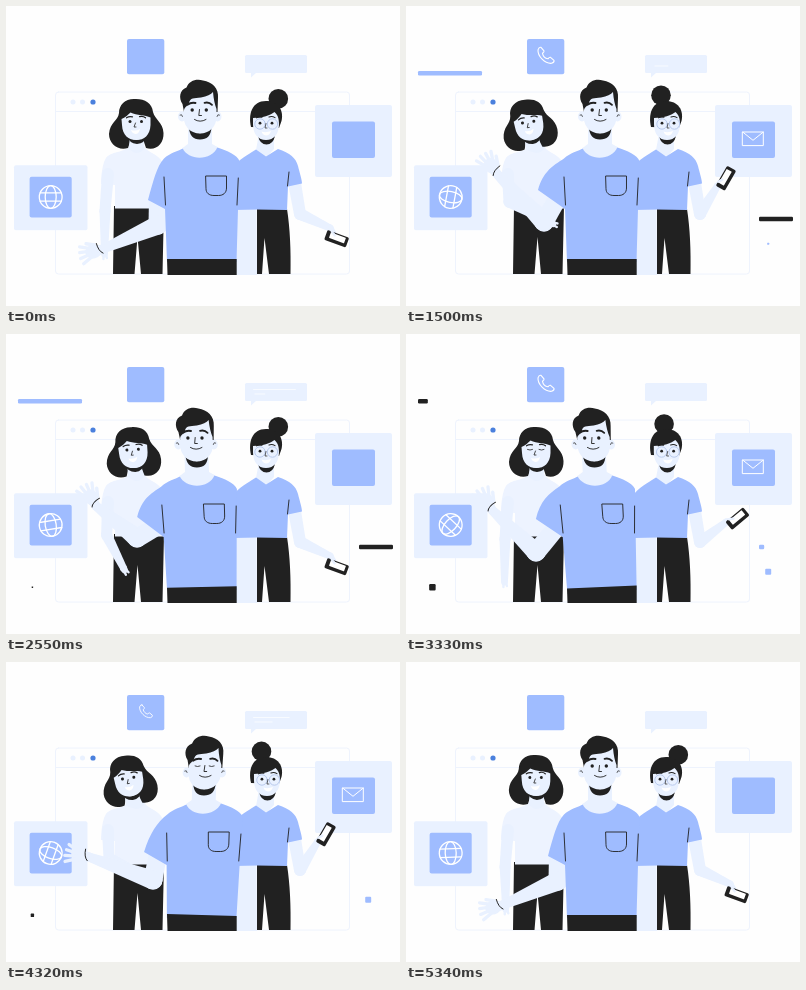
An HTML page with a canvas that plays this animation: 394 by 300 pixels, repeating every 5370 ms.

```html
<!DOCTYPE html>
<html lang="en">
<head>
<meta charset="utf-8">
<title>Team waving</title>
<style>
  html, body { margin: 0; width: 100%; height: 100%; overflow: hidden; background: #fefefe; }
  canvas { display: block; width: 394px; height: 300px; }
</style>
</head>
<body>
<canvas id="stage"></canvas>
<script>
const W = 394, H = 300, LOOP = 5370;
const PALE = '#e9f1ff', SHIRT = '#edf3ff', BLUE = '#9fbcff', DARK = '#212121',
      WHITE = '#ffffff', VIVID = '#3c82f0', EDGE = '#eef3fd';

const canvas = document.getElementById('stage');
const c = canvas.getContext('2d');
const dpr = window.devicePixelRatio || 1;
canvas.width = W * dpr;
canvas.height = H * dpr;

// ---------- drawing helpers ----------
function fill(d, color) { c.fillStyle = color; c.fill(new Path2D(d)); }

function line(d, color = DARK, width = 1) {
  c.strokeStyle = color;
  c.lineWidth = width;
  c.lineCap = c.lineJoin = 'round';
  c.stroke(new Path2D(d));
}

function dot(x, y, rx, color, ry = rx) {
  c.fillStyle = color;
  c.beginPath();
  c.ellipse(x, y, rx, ry, 0, 0, 7);
  c.fill();
}

function box(x, y, w, h, r, color) {
  c.fillStyle = color;
  c.beginPath();
  c.roundRect(x, y, w, h, r);
  c.fill();
}

// Tapered limb with round ends.
function limb([ax, ay], [bx, by], wa, wb, color = PALE) {
  const a = Math.atan2(by - ay, bx - ax), nx = -Math.sin(a) / 2, ny = Math.cos(a) / 2;
  fill(`M${ax + nx * wa} ${ay + ny * wa}L${bx + nx * wb} ${by + ny * wb}` +
       `L${bx - nx * wb} ${by - ny * wb}L${ax - nx * wa} ${ay - ny * wa}Z`, color);
  dot(ax, ay, wa / 2, color);
  dot(bx, by, wb / 2, color);
}

function at(x, y, angle, scale, draw) {
  c.save();
  c.translate(x, y);
  c.rotate(angle * Math.PI / 180);
  c.scale(scale, scale);
  draw();
  c.restore();
}

// ---------- timing helpers ----------
const mix = (a, b, p) => a + (b - a) * p;
const mixPt = (a, b, p) => a.map((v, i) => mix(v, b[i], p));

function ease(t, start, end) {
  const p = Math.min(1, Math.max(0, (t - start) / (end - start)));
  return p * p * (3 - 2 * p);
}

// 0 -> 1 -> 0
const pulse = (t, a, b, d, e) => ease(t, a, b) * (1 - ease(t, d, e));

// Smooth looping curve through [time, value...] rows, flat at turning points.
function track(rows, t) {
  const n = rows.length;
  const row = i => {
    const r = rows[(i + n) % n], shift = Math.floor(i / n) * LOOP;
    return [r[0] + shift, ...r.slice(1)];
  };
  let i = n - 1;
  while (rows[i][0] > t) i--;
  const [p, a, b, q] = [row(i - 1), row(i), row(i + 1), row(i + 2)];
  const span = b[0] - a[0], u = (t - a[0]) / span;
  const slope = (l, m, r, k) => {
    const s1 = (m[k] - l[k]) / (m[0] - l[0]), s2 = (r[k] - m[k]) / (r[0] - m[0]);
    return s1 * s2 <= 0 ? 0 : 2 * s1 * s2 / (s1 + s2);
  };
  return a.slice(1).map((v, j) => {
    const k = j + 1, d = b[k] - v;
    const m0 = slope(p, a, b, k) * span, m1 = slope(a, b, q, k) * span;
    return v + u * (m0 + u * (3 * d - 2 * m0 - m1 + u * (m0 + m1 - 2 * d)));
  });
}

// time, head lean
const LEAN = [[0, 0], [780, 7], [1500, 0], [2550, -4], [3330, -7], [4320, 5]];

// time, sleeve tip, elbow, wrist, hand angle
const WAVE = [
  [0,    142, 194, 152, 219, 97, 243, -195],
  [400,  137, 187, 140, 217, 79, 206, -155],
  [780,  132, 181, 133, 215, 95, 162, -100],
  [1500, 132, 184, 138, 216, 91, 168, -125],
  [2550, 133, 183, 131, 204, 90, 172, -120],
  [3330, 133, 185, 130, 218, 86, 176, -120],
  [4320, 136, 190, 147, 218, 83, 195, -168]
];

// ---------- scenery ----------
function browser() {
  c.strokeStyle = EDGE;
  c.lineWidth = 1;
  c.beginPath();
  c.roundRect(49.5, 86, 294, 182, 3);
  c.stroke();
  line('M50 105.5H343', EDGE);
  dot(67, 96, 2.5, PALE);
  dot(76.5, 96, 2.5, PALE);
  dot(87, 96, 2.6, '#4a80dd');
}

function bubble(t) {
  box(239, 49, 62, 18, 1.5, PALE);
  fill('M245 66V71.5L251 66Z', PALE);
  const p = t % (LOOP / 8);
  const top = 42 * pulse(p, 150, 340, 540, 645), low = 17 * pulse(p, 30, 220, 440, 655);
  if (top > 0.5) line(`M247.5 55.5h${top}`, '#f8fbff', 1);
  if (low > 0.5) line(`M249 60h${low}`, '#f8fbff', 1);
}

function cards(t, half) {
  box(121, 33, 37.3, 35.3, 2, BLUE);
  box(8, 159.3, 73.5, 65, 2, PALE);
  box(23.6, 170.7, 42.1, 40.9, 2, BLUE);
  box(309, 99, 77, 72, 2, PALE);
  box(326, 115.4, 43, 36.7, 2, BLUE);

  const call = pulse(half, 300, 600, 1550, 1850);
  if (call > 0.02) at(140, 49.3, 0, call, () => line(
    'M-5-8L-2-4.5Q-1.5-3.5-3.5-2C-3 .5-.5 3 2 3.5Q3.5 1.5 4.5 2L8 5Q8.5 7 5.5 8' +
    'C-1 8.5-8.5 1-8-5.5Q-7-8.5-5-8Z', WHITE, 1.1));

  const mail = pulse(half, 320, 620, 1640, 1940);
  if (mail > 0.02) at(347, 132.8, 0, mail, () =>
    line('M-10.3-6.8H10.3V6.8H-10.3ZL-10.3-6.8L0 1.5L10.3-6.8', WHITE, 1));

  at(44.7, 191, t / LOOP * 360, 1, () => {
    c.strokeStyle = WHITE;
    c.lineWidth = 1.3;
    for (const rx of [11.4, 5.5]) {
      c.beginPath();
      c.ellipse(0, 0, rx, 11.4, 0, 0, 7);
      c.stroke();
    }
    line('M-10.5-4.2H10.5M-10.5 4.2H10.5', WHITE, 1.3);
  });
}

function streaks(t) {
  const period = LOOP / 5, turn = Math.floor(t / period), p = t % period;
  const head = ease(p, 15, 395), tail = ease(p, 510, 1060);
  const bar = (x, y, w, color) => {
    const len = w * (head - tail);
    if (len > 0.4) box(x + w * tail, y, len, 4.4, 1.2, color);
  };
  bar(12, 65, 64, [VIVID, BLUE, BLUE, DARK, BLUE][turn]);
  bar(353, 210.8, 34, [DARK, DARK, DARK, BLUE, DARK][turn]);
}

function specks(t) {
  const p = t % (LOOP / 4);
  const square = (x, y, s, color) => s > 0.3 && box(x - s / 2, y - s / 2, s, s, s / 6, color);
  square(26.4, 253.3, 6.5 * pulse(p, 150, 430, 1000, 1300), DARK);
  square(362.2, 237.8, 6 * pulse(p, 70, 300, 900, 1200), BLUE);
}

// ---------- people ----------
function eyes(x1, x2, y, r, shut) {
  for (const x of [x1, x2]) {
    if (shut) line(`M${x - 2.5} ${y}q2.5 1.2 5 0`, DARK, 0.8);
    else dot(x, y, r, DARK);
  }
}

function leftWoman(half, shut) {
  const tilt = pulse(half, 1000, 1450, 2380, 2685);
  const elbow = mixPt([99, 205], [103, 196], tilt);
  const hand = mixPt([98.5, 246], [145, 217], tilt);

  fill('M108 200H158L156.5 268H135L131.5 231L128.5 268H107Z', DARK);
  fill('M123 138C123 147 106 144 100 152C96 158 95 172 95 178L109 179L109 202.5H158V160' +
       'C154 146 138 147 138 138Z', SHIRT);
  fill('M124 130H138V143Q131 151 123 143Z', PALE);

  at(131 - 3 * tilt, 145, -9 * tilt, 1, () => {
    c.translate(-131, -145);
    fill('M130 93C120 92 113 98 113 107C112 115 104 116 103 128C103 138 112 145 122 142' +
         'L124 136H138L140 142C150 145 158 138 157.5 127C157 116 149 114 147 106' +
         'C146 97 139 93 130 93Z', DARK);
    fill('M124 128H138V142Q131 150 123 142Z', PALE);
    fill('M121 130Q130 138 141 129Q139 137.5 131 138Q123 137 121 130Z', DARK);
    fill('M115.5 113C119 111.5 122 109 124.5 106.5C131 109.5 139 109 144.5 111.5V119' +
         'C144 129.5 138 134 130.5 134C122.5 134 116.5 129.5 116 119Z', PALE);
    line('M120.5 111.8Q123 110 126.5 110.8M133.5 110.6Q137 109.6 139.5 111.8', DARK, 1.2);
    eyes(124, 135.5, 115.5, 1.5, shut);
    line('M129.5 117L128 121H130', DARK, 0.8);
    fill('M125 124Q130 125.5 134 123Q133 128 129.5 128Q126 127.5 125 124Z', WHITE);
  });

  limb([102, 168], elbow, 12, 11);
  limb(elbow, hand, 11, 7);
  const a = Math.atan2(hand[1] - elbow[1], hand[0] - elbow[0]) * 180 / Math.PI;
  at(hand[0], hand[1], a, 1, () => {
    dot(1, 0, 4.5, PALE, 3.5);
    line('M2-1.5L6-2.5M3 1L7 1', PALE, 2.4);
  });
}

function rightWoman(half) {
  const look = pulse(half, 310, 770, 1590, 2050);
  const lift = pulse(half, 350, 790, 1640, 2120);

  fill('M251 203H281C284 222 285 245 284.5 268H263L258.5 232L256 268H251Z', DARK);
  fill('M228 200H250.5L251 269H228Z', PALE);

  const polar = (r, deg) => [294 + r * Math.cos(deg * Math.PI / 180),
                             208 + r * Math.sin(deg * Math.PI / 180)];
  const wrist = polar(33, mix(25, -58, lift)), phone = polar(44.2, mix(34, -54, lift));
  limb([288, 174], [294, 208], 13, 12);
  limb([294, 208], wrist, 12, 7);
  limb(wrist, mixPt(wrist, phone, 0.55), 7, 6);
  at(phone[0], phone[1], mix(20, -60, lift), 1, () => {
    box(-11.5, -5.2, 23, 10.4, 1.6, DARK);
    box(-7.5, -4, 16, 5.8, 0.5, WHITE);
    line('M-7-5L-3-2.5', PALE, 2.4);
  });

  fill('M253 128H268V143L260 152L250 144Z', PALE);
  fill('M250 143.5L260 150.5L272 143C284 147 290 152 292 160C294 168 296 174 296 177.5' +
       'L282 180.5L281 204L251 203.5L228 204V160C236 151 245 147 250 143.5Z', BLUE);
  line('M283 166L281.5 180', DARK, 0.9);

  dot(mix(272.3, 255, look), mix(92.8, 89.3, look), 9.8, DARK);
  fill('M245 121C242 108 246 95 260 95C272 95 278 104 275.5 115L273 122Z', DARK);
  c.save();
  c.translate(look, 0);
  fill('M252 130Q260 136 269 130Q267 138.5 260.5 138.5Q254 138.5 252 130Z', DARK);
  fill('M247 112C256 112 265 109 268.5 106C272 109 273 113 273 118' +
       'C273 128 268 134 260 134C252 134 247 128 247 118Z', PALE);
  c.translate(look, 0);
  line('M250.5 111.8Q253 110.4 256 111.2M263 111Q266 109.8 269 111.6', DARK, 1.1);
  c.strokeStyle = '#b4c6ea';
  c.lineWidth = 0.9;
  for (const x of [254, 266.5]) {
    c.beginPath();
    c.arc(x, 118, 5.2, 0, 7);
    c.stroke();
  }
  eyes(254, 266, 117.2, 1.4, false);
  line('M260 117.5L259 122H261', DARK, 0.7);
  fill('M255.5 125.5Q260 127 265 125Q263.5 129.5 260 129.5Q256.5 129 255.5 125.5Z', WHITE);
  c.restore();
}

function waveHand(wrist, angle) {
  at(wrist[0], wrist[1], angle, 1, () => {
    c.translate(10, 0);
    limb([-10, 0], [-2, 0], 9, 11);
    dot(0, 0, 8, PALE, 7);
    for (const y of [-6, -2.2, 1.6, 5.2]) {
      const reach = 16 - Math.abs(y + 1) * 0.4;
      line(`M3 ${y * 0.8}L${reach - 1.5} ${y * 1.55}`, PALE, 3.3);
    }
    line('M-3 6L5 9.5', PALE, 3.4);
    line('M-5 7Q-5-1-9-4', DARK, 0.9);
  });
}

function man(t) {
  const [lean] = track(LEAN, t);
  const [tx, ty, ex, ey, wx, wy, angle] = track(WAVE, t);
  const elbow = [ex, ey], wrist = [wx, wy], shear = lean / 153, slant = lean * 0.2;

  limb([152, 192], elbow, 18, 19);
  limb(elbow, wrist, 19, 9);
  waveHand(wrist, angle);

  c.save();
  c.transform(1, 0, -shear, 1, 253 * shear, 0);
  fill('M178 142C182 152 206 152 210 141C222 145 231 149 233.5 155L232 203L230.5 256' +
       `L161 256L159 203L${tx} ${ty}C${tx + 5} ${ty - 18} ${mix(tx, 158, 0.55)} 160 158 152.5` +
       'C164 147 172 145 178 142Z', BLUE);
  line('M158 171L159.5 199M232.3 172L231 199', DARK, 0.9);
  line('M200 170H220.5V182C220.5 187 217 189.5 212.5 189.5H208C203 189.5 200 187 200 183Z', DARK, 0.9);

  fill('M182 118V138L176.5 142C182 155 206 155 211.5 141L206 138V118Z', PALE);
  fill('M183 122C188 129 201 129 205.5 121C205 130 201 133.5 194 133.5C187 133.5 183.5 129 183 122Z', DARK);
  dot(176, 110.5, 4, PALE, 5);
  dot(211.5, 110.5, 4, PALE, 5);
  fill('M178 106L176.5 98C172.5 92 173.5 84 180.5 81.5C183 75 190 72.5 197 74.5' +
       'C206 76 213 82 212 92L211.5 106Z', DARK);
  fill('M178 104C179 100.5 182 100 183 97C184 91.5 188 92.5 195 91.5C201 90.5 205 88.5 207 86' +
       'C207.5 93 209 99 210.5 103V111C210.5 121 203 127.5 194 127.5C185 127.5 178 121 178 112Z', PALE);
  line('M174 109q2-1.5 2.5 1.5M213.5 109q-2-1.5-2.5 1.5', DARK, 0.7);
  c.translate(lean * 0.1, 0);
  line('M181.5 98.8Q185 96 189.5 97M198.5 96.8Q203 95.6 206 98.8', DARK, 1.8);
  eyes(186.2, 200.3, 104, 1.7, t > 4250 && t < 4400);
  line('M193.5 103.5L192.8 109.5H195.5', DARK, 0.9);
  line('M188.5 113.5Q194 117 200 113.5', DARK, 0.9);
  c.restore();

  fill(`M161 ${253 - slant}L230.7 ${253 + slant}V269H161.5Z`, DARK);
}

function render(t) {
  const half = t % (LOOP / 2);
  c.setTransform(dpr, 0, 0, dpr, 0, 0);
  c.fillStyle = '#fefefe';
  c.fillRect(0, 0, W, H);
  browser();
  bubble(t);
  cards(t, half);
  streaks(t);
  specks(t);
  leftWoman(half, half > 590 && half < 715);
  rightWoman(half);
  man(t);
}

const began = performance.now();
function tick() {
  render((performance.now() - began) % LOOP);
  requestAnimationFrame(tick);
}
tick();
</script>
</body>
</html>
```
